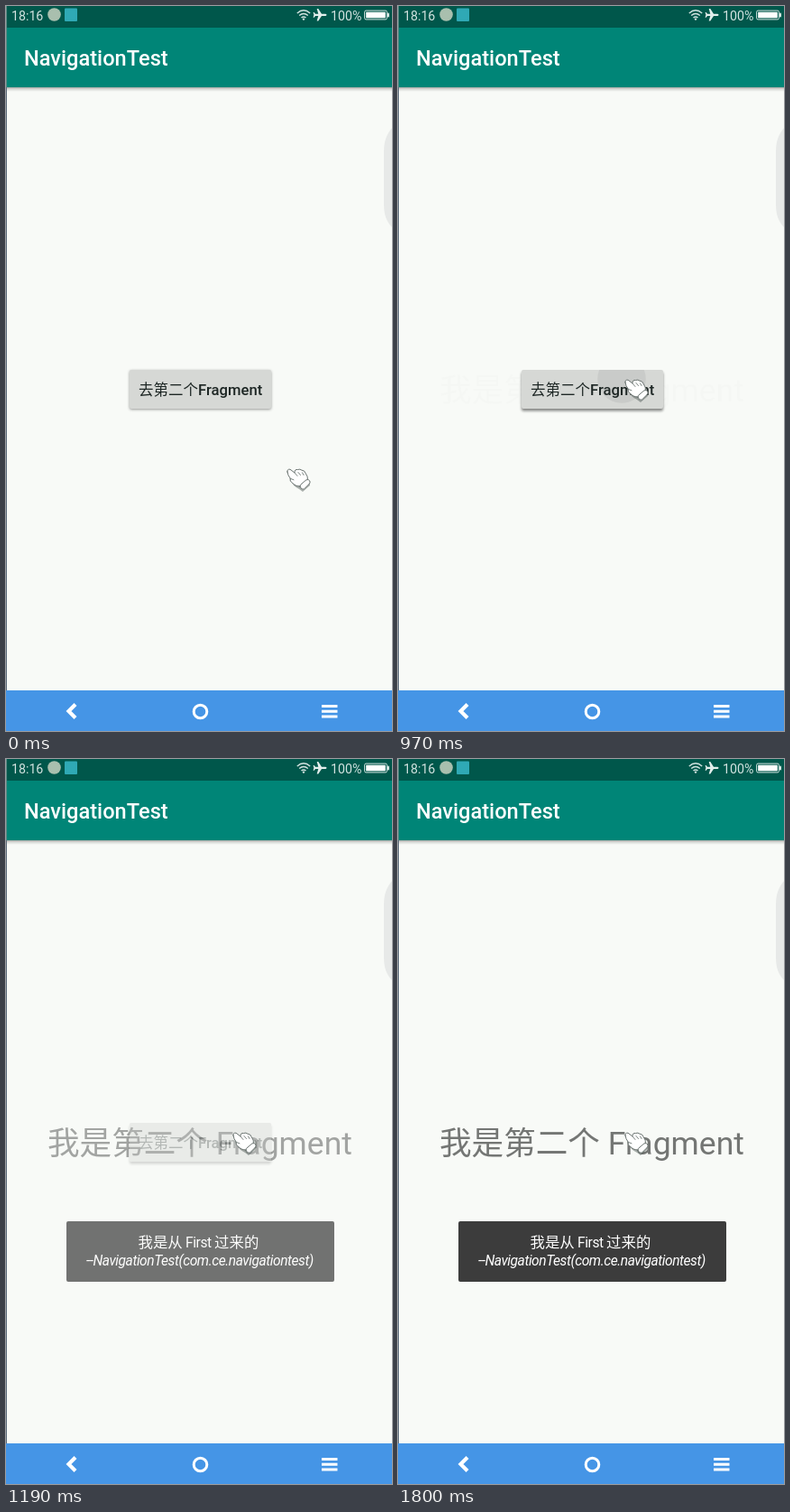
Animation of 428 by 803 pixels, one loop 2200 ms. Source, as an HTML page:

```html
<!DOCTYPE html>
<html lang="zh">
<head>
<meta charset="utf-8">
<title>NavigationTest</title>
<style>
  html, body { margin: 0; width: 100%; height: 100%; overflow: hidden; background: #f8faf7; }
  svg { display: block; width: 100%; height: 100%; }
  text { font-family: Roboto, "Noto Sans CJK SC", "Noto Sans CJK JP", "Noto Sans CJK", sans-serif; }
  .status { font-size: 14.2px; fill: #d3e3e0; }
  .title { font-size: 23.6px; font-weight: 500; fill: #fff; }
  .label { font-size: 16.5px; fill: #1d2624; }
  .label tspan { font-size: 16.65px; font-weight: 500; }
  .big { font-size: 35.6px; fill: #747674; }
  .toast { font-size: 16.4px; fill: #fff; }
  .narrow { font-size: 15.6px; letter-spacing: -.45px; }
  .line { fill: none; stroke: #fff; }
</style>
</head>
<body>
<svg viewBox="0 0 428 803" preserveAspectRatio="none">
  <defs>
    <linearGradient id="drop" x2="0" y2="1">
      <stop offset="0" stop-opacity=".34"/>
      <stop offset=".4" stop-opacity=".13"/>
      <stop offset="1" stop-opacity="0"/>
    </linearGradient>
    <filter id="blur" x="-10%" y="-30%" width="120%" height="160%">
      <feGaussianBlur stdDeviation="1.6"/>
    </filter>
    <clipPath id="face"><rect x="137" y="403" width="157" height="43" rx="2"/></clipPath>
  </defs>

  <rect width="428" height="803" fill="#f8faf7"/>
  <path d="M428 135C422 142 419 150 419 161V220C419 231 422 239 428 245Z" fill="#e7e9e8"/>

  <!-- bars -->
  <rect y="90" width="428" height="5" fill="url(#drop)"/>
  <rect y="24" width="428" height="66" fill="#008577"/>
  <rect width="428" height="24" fill="#00574b"/>
  <rect y="758" width="428" height="45" fill="#4595e6"/>
  <rect y="90" width="1" height="668" fill="#5d6c7b"/>
  <rect width="1" height="90" fill="#5d8a86"/>

  <!-- status -->
  <text class="status" x="6" y="15.5">18:16</text>
  <circle cx="53.5" cy="9.5" r="7.3" fill="#a9bfae"/>
  <rect x="65" y="2.5" width="14" height="14.5" rx="1" fill="#2fa9b5"/>
  <g fill="none" stroke="#d3e3e0" stroke-width="1.4">
    <path d="M322.8 8Q330 1.5 337.2 8M325.2 10.6Q330 6.3 334.8 10.6M327.5 13Q330 10.8 332.5 13"/>
  </g>
  <circle cx="330" cy="14.6" r="1.2" fill="#d3e3e0"/>
  <path d="M355.5 9.8Q355.5 11 354 11H350L346.3 16.6H344.7L346.3 11H343L341.7 12.7H340.6L341.4 9.8L340.6 7H341.7L343 8.7H346.3L344.7 3H346.3L350 8.7H354Q355.5 8.7 355.5 9.8Z" fill="#e3eeec"/>
  <text class="status" x="360" y="15.5">100%</text>
  <rect x="397.6" y="5.1" width="24.8" height="9.8" rx="1.5" fill="none" stroke="#d3e3e0"/>
  <rect x="399.2" y="6.7" width="21.6" height="6.6" fill="#fff"/>
  <rect x="423" y="7.5" width="2" height="5" rx="1" fill="#d3e3e0"/>

  <text class="title" x="20" y="66">NavigationTest</text>

  <!-- second page -->
  <text class="big" id="second" x="46" y="438">我是第二个 Fragment</text>

  <!-- first page -->
  <g id="first">
    <rect id="shade" x="137" y="403" width="157" height="43" rx="2" filter="url(#blur)"/>
    <rect x="137" y="403" width="157" height="43" rx="2" fill="#d6d8d5"/>
    <g clip-path="url(#face)"><circle id="ripple" cx="248" cy="413" fill="#c9cbc9"/></g>
    <text class="label" x="147" y="430.5">去第二个<tspan>Fragment</tspan></text>
  </g>

  <g id="toast">
    <rect x="67" y="512" width="297" height="67" rx="2" fill="#3c3c3c"/>
    <text class="toast" x="146.5" y="541">我是从<tspan class="narrow"> First </tspan>过来的</text>
    <text class="toast narrow" x="89" y="561" font-style="italic">--NavigationTest(com.ce.navigationtest)</text>
  </g>

  <!-- navigation keys -->
  <path class="line" d="M77 773.5L69.5 781L77 788.5" stroke-width="4.2"/>
  <circle class="line" cx="215.5" cy="781.5" r="7.3" stroke-width="3"/>
  <path class="line" d="M350 775.5H367.5M350 781.2H367.5M350 787H367.5" stroke-width="3"/>

  <!-- pointer -->
  <g id="hand" stroke-linejoin="round" stroke-linecap="round">
    <path d="M3 11Q7 20 14 23L18 26L26 19V14Z" fill="#46534e" opacity=".45"/>
    <path d="M1 4Q.5 .8 4 1.2L9 5Q9 .8 12.5 1.5Q15 .4 17 2.2Q20 2.2 21 5.2Q24 9 23.5 13.5L16 20Q9 20 6.5 16Q3 14.5 4.4 11.4Q1.5 8 1 4Z" fill="#fff" stroke="#6b7471" stroke-width="1"/>
    <path d="M9 5L12 8.5M13 4.5L15.5 7.5M17.5 4.8L19 7.5M4.4 11.4L8 12.8" fill="none" stroke="#7c8582" stroke-width="1"/>
    <path d="M15 20.5Q14.5 18.5 17 17L22 12.8Q24.5 11.8 25.8 14Q26.8 16 25 17.6L19.5 23Q17 24.5 15 20.5Z" fill="#fff" stroke="#6b7471" stroke-width="1"/>
  </g>
</svg>
<script>
const LOOP = 2200;
const $ = id => document.getElementById(id);
const clamp = v => Math.min(1, Math.max(0, v));

// [time, value] pairs, linear between them
const tracks = {
  first:  [[960, 1], [1040, .93], [1130, .68], [1220, .13], [1270, 0]],
  second: [[950, 0], [970, .015], [1040, .1], [1130, .32], [1220, .8], [1300, 1]],
  toast:  [[1020, 0], [1130, .46], [1220, .835], [1265, 1]],
  ripple: [[900, 0], [970, 26], [1100, 125]],
  lift:   [[740, 0], [950, 1]]
};

function at(track, t) {
  if (t <= track[0][0]) return track[0][1];
  for (let i = 1; i < track.length; i++) {
    const [t0, a] = track[i - 1], [t1, b] = track[i];
    if (t < t1) return a + (b - a) * (t - t0) / (t1 - t0);
  }
  return track[track.length - 1][1];
}

function draw(t) {
  for (const id of ["first", "second", "toast"]) $(id).setAttribute("opacity", at(tracks[id], t));
  $("ripple").setAttribute("r", at(tracks.ripple, t));

  const lift = at(tracks.lift, t);
  $("shade").setAttribute("transform", `translate(0 ${1 + lift * 1.6})`);
  $("shade").setAttribute("fill-opacity", .4 + lift * .08);

  const move = t < 240 ? 0 : 1 - (1 - clamp((t - 205) / 345)) ** 1.66;
  $("hand").setAttribute("transform", `translate(${311 - 60 * move} ${512 - 99 * move})`);
}

const start = performance.now();
function tick(now) {
  draw(Math.max(0, now - start) % LOOP);
  requestAnimationFrame(tick);
}
draw(0);
requestAnimationFrame(tick);
</script>
</body>
</html>
```
